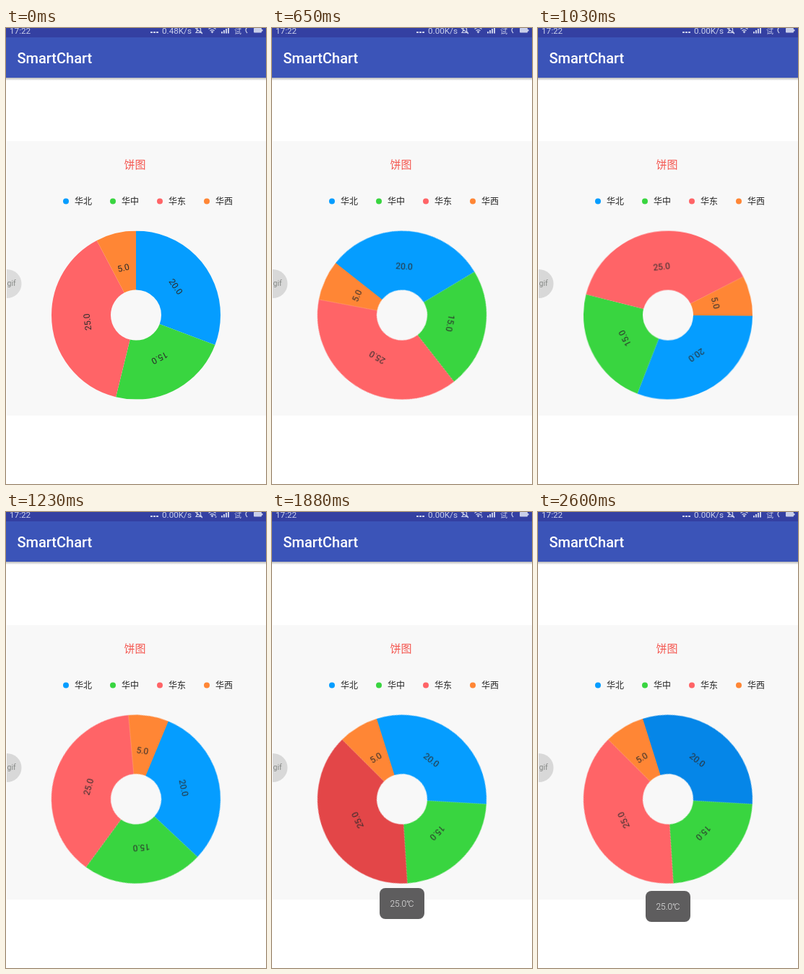
These frames come from a looping animation (360x633 px, 3.38 s). An HTML page:

```html
<!DOCTYPE html>
<html lang="zh">
<head>
<meta charset="utf-8">
<title>SmartChart</title>
<style>
html, body { margin: 0; width: 100%; height: 100%; overflow: hidden; background: #fff; }
svg { display: block; width: 100%; height: 100%; font-family: Roboto, "Noto Sans CJK SC", "Noto Sans CJK", sans-serif; }

.status { fill: #c9cfea; font-size: 11.7px; }
.icon { fill: none; stroke: #c9cfea; stroke-width: 1.2; }
.legend { fill: #222; font-size: 12px; }
.label { fill: #2b2b2b; font-size: 12px; text-anchor: middle; }
.wedge { fill: none; stroke-width: 82; }

/* Every change is a hard cut; percentages are ms / 33.8 */
.anim { animation: 3380ms step-end infinite; }
.speed-busy { animation-name: busy; }
.speed-idle { animation-name: idle; }
.transfer { animation-name: transfer; }
.badge { animation-name: badge; }
.wheel { animation-name: spin; }
.toast { animation-name: toast; }
.east { animation-name: east; }
.west { animation-name: west; }
.north { animation-name: north; }

@keyframes busy { 0% { opacity: 1 } 2.662%, 100% { opacity: 0 } }
@keyframes idle { 0% { opacity: 0 } 2.662%, 100% { opacity: 1 } }
@keyframes transfer { 0% { opacity: 0 } 33.135% { opacity: 1 } 58.875%, 100% { opacity: 0 } }
@keyframes badge { 0% { fill: #dcdcdc } 2.662%, 100% { fill: #d8d8d8 } }

/* A fling that decelerates to rest */
@keyframes spin {
  0% { transform: rotate(0deg) }
  19.23% { transform: rotate(-51.7deg) }
  21.893% { transform: rotate(-114deg) }
  24.852% { transform: rotate(-176deg) }
  27.514% { transform: rotate(-223.7deg) }
  30.473% { transform: rotate(-269.5deg) }
  33.135% { transform: rotate(-304.7deg) }
  36.39% { transform: rotate(-337.5deg) }
  39.349% { transform: rotate(-358.5deg) }
  41.715% { transform: rotate(-371deg) }
  44.082%, 100% { transform: rotate(-377.4deg) }
}
@keyframes toast {
  0% { opacity: 0; transform: translateY(19px) }
  50% { opacity: .45; transform: translateY(19px) }
  52.662% { opacity: .85; transform: translateY(2px) }
  55.621% { opacity: 1; transform: translateY(-4px) }
  58.875%, 100% { opacity: 1; transform: none }
}
@keyframes east { 0% { stroke: #ff6467 } 47.041% { stroke: #e34648 } 62.13%, 100% { stroke: #ff6467 } }
@keyframes west { 0% { stroke: #ff8635 } 62.13% { stroke: #e8701f } 76.923%, 100% { stroke: #ff8635 } }
@keyframes north { 0% { stroke: #059dff } 76.923%, 100% { stroke: #0586e8 } }
</style>
</head>
<body>
<svg viewBox="0 0 360 633" preserveAspectRatio="none">
  <defs>
    <linearGradient id="shade" x2="0" y2="1">
      <stop stop-color="#000" stop-opacity=".28"/>
      <stop offset="1" stop-color="#000" stop-opacity="0"/>
    </linearGradient>
  </defs>
  <rect width="360" height="633" fill="#fff"/>

  <!-- App bar -->
  <rect y="69" width="360" height="4" fill="url(#shade)"/>
  <rect width="360" height="69" fill="#3b54b8"/>
  <rect width="360" height="13" fill="#3440a2"/>
  <text x="15.5" y="48.5" font-size="20" font-weight="500" fill="#fff">SmartChart</text>

  <!-- Status bar -->
  <g class="status">
    <text x="5" y="8">17:22</text>
    <path d="M200 5h3v2h-3zm4 0h3v2h-3zm4 0h3v2h-3z"/>
    <text class="anim speed-busy" x="216" y="8">0.48K/s</text>
    <text class="anim speed-idle" x="216" y="8">0.00K/s</text>
    <path class="icon" d="M263 6.5h8l-1.5-2V1q-2.5-3-5 0v3.5zM262 0l10 8"/>
    <path class="icon" d="M280.5 1.5q5-4 10 0M282.5 3.8q3-2.4 6 0"/>
    <path d="M283.5 5q2-1.5 4 0l-2 2.5z"/>
    <path class="anim transfer" d="M288 5l1.5-2 1.5 2zm1 1.2h3l-1.5 1.8z"/>
    <path d="M298 5h2v2.5h-2zm3-2h2v4.5h-2zm3-2h2v6.5h-2zm3-2h2v8.5h-2z"/>
    <text x="316" y="7.5" style="font-size:10px">试</text>
    <path class="icon" d="M334-1q-4 4 0 8"/>
    <rect x="343" y="0" width="11" height="6.5" rx="1"/>
    <rect x="354" y="2" width="1.5" height="2.5"/>
  </g>

  <!-- Chart panel -->
  <rect x="1" y="157" width="359" height="381" fill="#f8f8f8"/>
  <text x="178.5" y="194.5" font-size="15" text-anchor="middle" fill="#f4564f">饼图</text>
  <g class="legend">
    <circle cx="83" cy="240.5" r="4" fill="#059dff"/><text x="95" y="245">华北</text>
    <circle cx="148" cy="240.5" r="4" fill="#39d540"/><text x="160" y="245">华中</text>
    <circle cx="213" cy="240.5" r="4" fill="#ff6467"/><text x="225" y="245">华东</text>
    <circle cx="278" cy="240.5" r="4" fill="#ff8635"/><text x="290" y="245">华西</text>
  </g>

  <!-- Ring: the path length equals the sum of the values -->
  <g transform="translate(180 398.6)">
    <g class="anim wheel">
      <g class="wedge" transform="rotate(-90)">
        <circle class="anim north" r="76" pathLength="65" stroke="#059dff" stroke-dasharray="20 45"/>
        <circle r="76" pathLength="65" stroke="#39d540" stroke-dasharray="15 50" stroke-dashoffset="-20"/>
        <circle class="anim east" r="76" pathLength="65" stroke="#ff6467" stroke-dasharray="25 40" stroke-dashoffset="-35"/>
        <circle class="anim west" r="76" pathLength="65" stroke="#ff8635" stroke-dasharray="5 60" stroke-dashoffset="-60"/>
      </g>
      <g class="label">
        <text transform="rotate(55.38)" x="-1.3" y="-63.7">20.0</text>
        <text transform="rotate(152.31)" x="-1.3" y="-63.7">15.0</text>
        <text transform="rotate(263.08)" x="-1.3" y="-63.7">25.0</text>
        <text transform="rotate(346.15)" x="-1.3" y="-63.7">5.0</text>
      </g>
    </g>
  </g>

  <!-- Recorder badge -->
  <path class="anim badge" d="M1 335a20.5 20 0 0 1 0 40z" fill="#d8d8d8"/>
  <text x="1.5" y="358" font-size="10.5" fill="#858885">gif</text>

  <g class="anim toast">
    <rect x="149" y="526" width="62" height="43" rx="8" fill="#5e5d5e"/>
    <text x="180" y="552" font-size="12" font-weight="300" text-anchor="middle" fill="#ededed">25.0℃</text>
  </g>
</svg>
</body>
</html>
```
